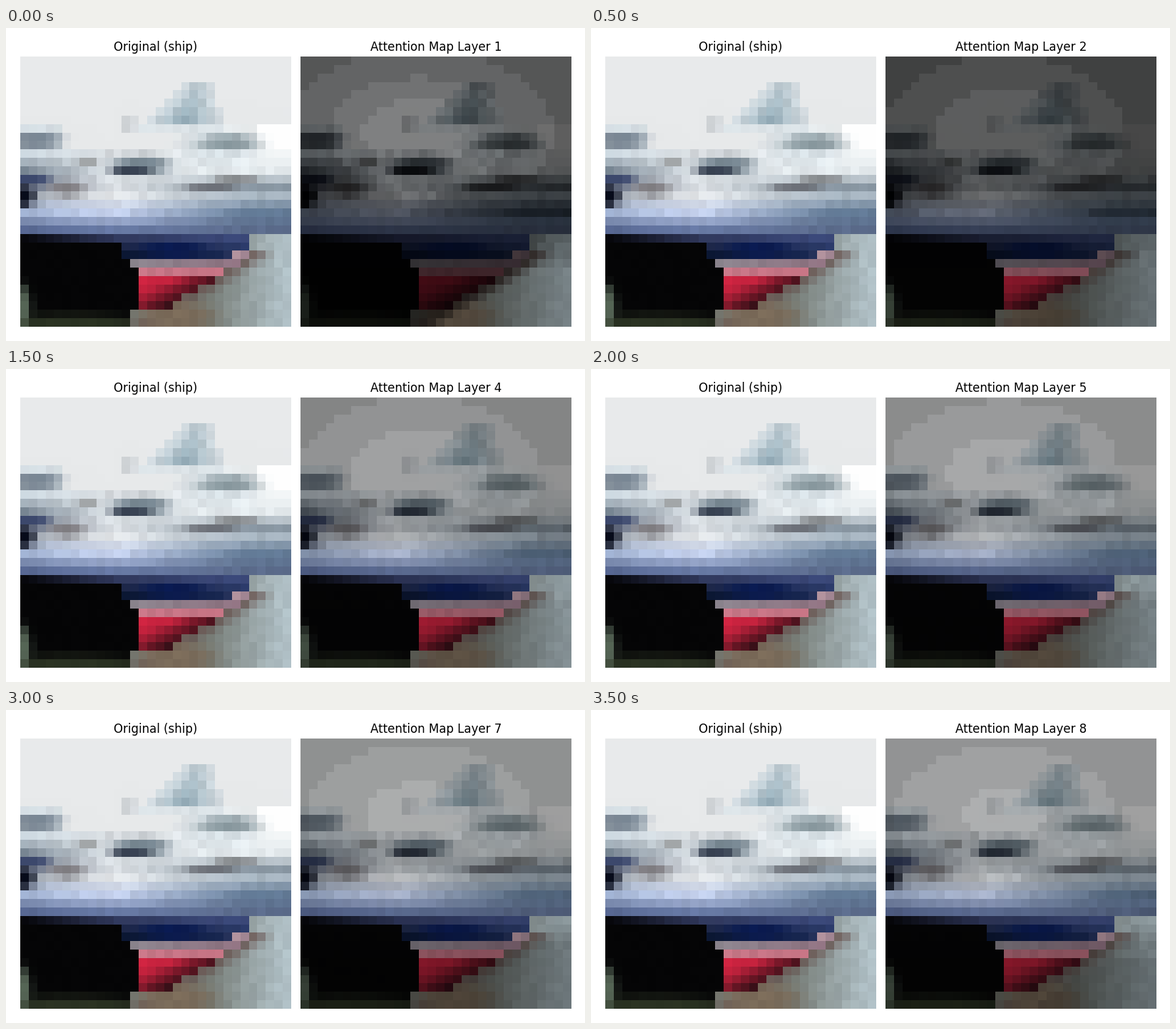
A matplotlib script that plays this animation: 812 px wide and 439 px high, repeating every 4 s.

```python
import matplotlib.pyplot as plt
import numpy as np
from matplotlib.animation import FuncAnimation
from matplotlib.colors import to_rgb

W, H, DPI = 812, 439, 100
N = 32  # cells per side of each picture

# Colours at the left, the middle and the right, keyed by height in cells.
STRIPES = {
    11.5: "#d0dce4 #d6dade #f4f7f8",
    13.5: "#788694 #e0e6ea #e4eaed",
    15.5: "#6c7488 #dde2e6 #8c9aa6",
    16.5: "#a0a8b4 #e6e9ec #a8b6c2",
    18.5: "#a0b2d2 #c8d4f0 #647c98",
    20.5: "#566690 #6a7ca8 #5c6c8c",
    21.5: "#050508 #30385c #3c4a7c",
    23.5: "#050508 #0a1530 #1c2c58",
    24.5: "#050508 #8a8890 #907080",
    25.5: "#050508 #c87888 #c07080",
}
STRIPE_X = [0, 11, 27]

# Soft spots: x, y, half width, half height, colour.
SPOTS = [
    (13, 8, 1, 1.2, "#d0d4d8"),            # funnel
    (14.3, 12.9, 3.6, 1.2, "#74848f"),     # bridge windows
    (13, 13.5, 2.3, .55, "#384252"),
    (23.5, 10.8, 5, 2.4, "#dce5ea"),       # stern cabin
    (24.5, 10.2, 3.8, 1, "#8c9ca2"),
    (1.8, 9.9, 3.4, 1.1, "#74818e"),       # bow fittings
    (8, 12.5, 1.3, .6, "#a8acae"),
    (1.2, 14.6, 2.4, .8, "#3c486c"),
    (5.5, 15.6, 2.2, 1, "#807e82"),
    (.3, 16.6, 1.5, 1.3, "#080c1c"),
    (22.5, 15.5, 3, .6, "#6e727a"),        # rail
    (25.5, 14.5, 2.6, .6, "#8b8f92"),
    (18, 22.8, 4, 1, "#0a1a50"),           # hull paint
    (25.9, 23.5, 1.1, .6, "#b0909a"),
]

# Attention per layer: sky, centre, hull, keel, water, contrast.
LAYERS = [
    (.37, .58, .42, .28, .70, .9), (.28, .43, .50, .65, .57, .5),
    (.43, .62, .72, .74, .62, .3), (.57, .72, .85, .75, .75, .1),
    (.60, .73, .85, .68, .66, .1), (.61, .73, .85, .63, .60, .1),
    (.62, .74, .86, .62, .60, .1), (.63, .74, .86, .62, .60, .1),
]

ys, xs = np.mgrid[0:N, 0:N] + 0.5
keel_edge = np.minimum(27, 28 - 1.57 * (ys - 23))


def rgb(color):
    return np.array(to_rgb(color))


def ramp(t, start, end):
    """Blend two colours over the grid, t running from 0 to 1."""
    t = np.clip(t, 0, 1)[..., None]
    return (1 - t) * rgb(start) + t * rgb(end)


def mix(img, weight, color):
    img += weight[..., None] * (rgb(color) - img)


def spot(img, x, y, rx, ry, color):
    r2 = ((xs - x) / rx) ** 2 + ((ys - y) / ry) ** 2
    mix(img, np.exp(-r2 ** 2), color)


def draw_tower(img):
    left, right = 22.5 - ys, 22 + .25 * ys
    area = (ys > 3) & (ys < 9) & (xs > left) & (xs < right)
    depth = np.minimum(xs - left, right - xs) / 4 * (ys < 8)
    img[area] = ramp(depth, "#d8dfe3", "#98b0bc")[area]


def draw_stripes(img):
    keys = np.array([[rgb(c) for c in row.split()]
                     for row in STRIPES.values()])
    for y in range(11, 26):
        for ch in range(3):
            row = [np.interp(y + .5, list(STRIPES), keys[:, k, ch])
                   for k in range(3)]
            img[y, :, ch] = np.interp(xs[0], STRIPE_X, row)


def draw_keel(img):
    img[ys > 26] = rgb("#050506")
    shade = 1.5 - (xs - 14) / 8 - (ys - 26) / 4
    red = (ys > 26) & (ys < 30) & (xs > 14)
    img[red] = ramp(shade, "#1a0c10", "#cc2440")[red]
    black = (ys > 22) & (xs < np.clip(12 + .7 * (ys - 23), 12, 14))
    img[black] = rgb("#050506")
    spot(img, 6, 31.5, 10, 1, "#2a3222")
    spot(img, 0, 29.5, 1.3, 2.5, "#586858")


def draw_water(img):
    area = (ys > 21) & ((xs > keel_edge) | (ys > 30) & (xs > 13))
    water = ramp((xs - 22) / 9, "#747a74", "#b0c0c6")
    seam = np.exp(-((xs - keel_edge - .5) / 1.6) ** 2) * (ys > 23)
    mix(water, .8 * seam, "#685450")
    spot(water, 18.5, 30.8, 4.5, 1.8, "#7c6c5a")
    img[area] = water[area]


def make_ship():
    img = np.full((N, N, 3), rgb("#e8eaeb"))
    img[(ys > 8) & (xs > 28)] = 1
    draw_tower(img)
    img[8:11, :5] = rgb("#dce5ea")
    draw_stripes(img)
    draw_keel(img)
    for args in SPOTS:
        spot(img, *args)
    draw_water(img)
    # Slight unevenness everywhere but in the flat sky
    grain = 1 + np.random.default_rng(4).uniform(-.04, .04, (N, N, 1))
    flat = (img.min(axis=2) > .9)[..., None]
    return np.clip(np.where(flat, img, img * grain), 0, 1)


def attention(img, sky, centre, hull, keel, water, contrast):
    mask = np.interp(ys, [0, 14, 19, 23, 26, 31],
                     [sky, sky, hull, hull, keel, keel])
    glow = np.exp(-((xs - 14) / 8) ** 2 / 2 - ((ys - 9) / 5) ** 2 / 2)
    mask += (centre - sky) * glow
    wet = np.clip((xs - keel_edge) / 3, 0, 1) * np.clip((ys - 20) / 6, 0, 1)
    mask += wet * (water - mask)
    # Coarse steps leave visible contours in the sky
    mask = sky + np.round((mask - sky) / .06) * .06
    light = np.clip(img.mean(axis=2) / .91, 0, 1)
    mask *= light ** (contrast * (ys < 19))
    return img * mask[..., None]


def add_panel(left, title, img):
    ax = fig.add_axes([left / W, 20 / H, 379.5 / W, 378.9 / H])
    ax.axis("off")
    picture = ax.imshow(img, interpolation="nearest", aspect="auto")
    return picture, ax.set_title(title, fontsize=12)


plt.rcParams["font.family"] = "DejaVu Sans"
fig = plt.figure(figsize=((W + .01) / DPI, (H + .01) / DPI), dpi=DPI,
                 facecolor="white")
ship = make_ship()
maps = [attention(ship, *layer) for layer in LAYERS]
add_panel(20, "Original (ship)", ship)
picture, title = add_panel(413, "Attention Map Layer 1", maps[0])


def update(i):
    picture.set_data(maps[i])
    title.set_text(f"Attention Map Layer {i + 1}")
    return picture, title


anim = FuncAnimation(fig, update, frames=len(LAYERS), interval=500,
                     repeat=True, repeat_delay=0, blit=False)
plt.show()
```
